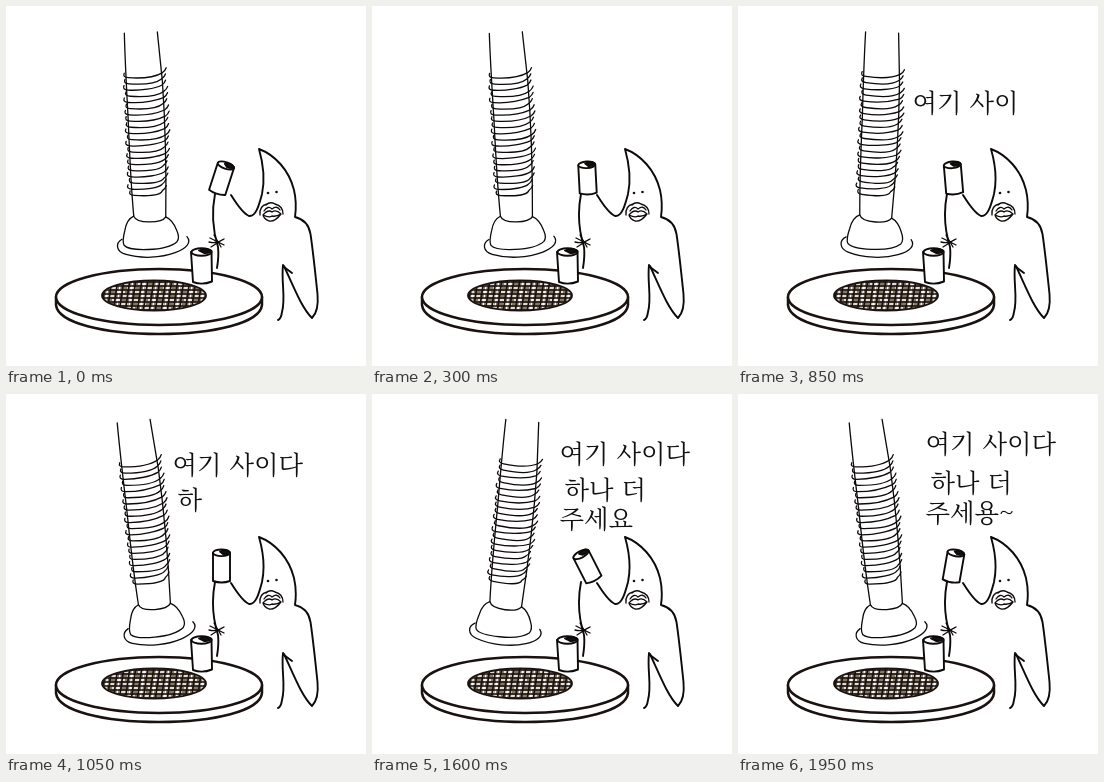
An HTML page that plays this animation: 360 px wide and 360 px high, repeating every 2300 ms.

```html
<!DOCTYPE html>
<html lang="ko">
<head>
<meta charset="utf-8">
<style>
html, body { margin: 0; width: 100%; height: 100%; overflow: hidden; background: #fff; }
svg { display: block; width: 100vw; height: 100vh; }
.ink { fill: none; stroke: #0d0a09; stroke-width: 1.9; stroke-linecap: round; stroke-linejoin: round; }
.white { fill: #fff; }
.thin { stroke-width: 1.3; }
.plate { stroke: #1a1210; stroke-width: 2.5; }
text { font: 300 25.4px "Noto Serif CJK KR", "Noto Serif KR", "Noto Sans CJK KR", "Noto Sans CJK", serif; fill: #111; white-space: pre; }
</style>
</head>
<body>
<svg viewBox="0 0 360 360">
  <defs>
    <clipPath id="grillClip"><ellipse cx="148" cy="289.5" rx="51.5" ry="14.5"/></clipPath>
  </defs>

  <g id="pipe" class="ink thin">
    <path d="M119.500 27C120 60 121.500 90 122.500 115C123.500 150 125 185 127 210Q129 216 143 216Q156 216 159 211C160 170 160 125 157 75L152.500 26"/>
    <path d="M127 210Q120 213 118 224Q115 235 117 239Q121 244 141 243.500Q162 243 170 236Q173 232 170 225Q166 214 159 211"/>
    <path d="M115 233C108 237 109 245 118 248C134 253 154 252 168 247C179 243 185 237 180 231"/>
    <path id="coils"/>
  </g>

  <g class="ink plate">
    <path class="white" d="M50 291V299C52 317 98 328 153 328S254 317 256 299V291"/>
    <ellipse class="white" cx="153" cy="291" rx="103" ry="28"/>
    <g clip-path="url(#grillClip)" stroke-linecap="butt">
      <rect x="94" y="272" width="110" height="36" fill="#857963" stroke="none"/>
      <path id="gaps" stroke="#fff" stroke-width="1.400"/>
      <path id="bars" stroke-width="1.700"/>
    </g>
    <ellipse cx="148" cy="289.500" rx="52" ry="15" stroke-width="1.800"/>
  </g>

  <g class="ink">
    <path d="M211 262Q213 250 212 241C208 228 205 208 209 188"/>
    <path d="M225 189C230 197 236 207 243 210C250 211 253 199 256 188C259 174 257 157 253 143C269 149 283 164 288 184Q291 197 289 211C297 213 303 219 304.500 228C307 245 309 264 311.500 288Q313 305 306 312C296 302 289 284 278 260"/>
    <path d="M277 259C275 276 280 292 276 306Q275 313 272 314M278 261L286 267"/>
    <path class="thin" d="M203 236Q211 238 218 233M204 232L218 239M208 229L215 241M205 241L216 234"/>
    <path class="thin" d="M260 199Q264 195 269 198M261 198Q253 200 254 209M269 198Q277 200 277 208M258 205Q262 199 266 203Q271 199 274 204"/>
    <path class="white thin" d="M257 209Q262 203 266 206Q270 203 275 208Q269 216 263 215Q258 213 257 209ZM257 209Q263 212 266 210Q270 211 275 208"/>
    <g fill="#111" stroke="none"><circle cx="262" cy="187" r="1.300"/><circle cx="270.500" cy="186" r="1.300"/></g>
  </g>

  <g class="ink">
    <path class="white" d="M185 246L187 276Q196 279.500 206 275.500L205.500 245"/>
    <ellipse class="white" cx="195.500" cy="246" rx="10" ry="3.800"/>
    <path fill="#111" d="M193 244.500Q200 241.500 205 244.500Q204 247.500 198 247Z"/>
  </g>

  <g id="can" class="ink">
    <path class="white" d="M207 159V187Q215.500 190 224 187V159"/>
    <ellipse class="white" cx="215.500" cy="158.800" rx="8.500" ry="3.300"/>
    <path fill="#111" d="M214 157.500Q220 154.500 223.500 158Q222 160.500 217 160Z"/>
  </g>

  <text></text><text></text><text></text>
</svg>
<script>
const LOOP = 2300, STEP = 50, LAST = 1950;
const el = id => document.getElementById(id);
const lines = document.querySelectorAll('text');

// [time, degrees]
const sway = [[0, -0.6], [150, -4.3], [750, 8.4], [1050, -4.3], [1650, 8.4], [1950, -4.3]];
const wave = [[0, 18], [300, -3], [600, -11], [1050, 0], [1350, -5], [1600, -27], [1950, 10]];

// Each keystroke as the input method composes it
const typed = [
  ['ㅇ', '여', '역', '여기', '여기 ', '여기 ㅅ', '여기 사', '여기 상', '여기 사이', '여기 사읻', '여기 사이다'],
  ['ㅎ', '하', '한', '하나', '하나 ', '하나 ㄷ', '하나 더'],
  ['ㅈ', '주', '줏', '주세', '주셍', '주세요', '주세용', '주세용~']
];
const typeStart = [450, 1000, 1350];

// [from time, x, baseline of each line]
const places = [
  [0, 174.5, 105.5, 140, 173], [1000, 166.5, 79.5, 114.5, 147], [1350, 177.5, 55.5, 90.5, 122],
  [1500, 187.5, 68.5, 104.5, 133.5], [1650, 187.5, 58.5, 97.5, 127.5]
];

function at(keys, t) {
  const i = Math.max(1, keys.findIndex(k => k[0] >= t));
  const [t0, a] = keys[i - 1], [t1, b] = keys[i];
  return a + (b - a) * (t - t0) / (t1 - t0);
}

function drawCoils() {
  let d = '';
  for (let i = 0; i < 20; i++) {
    const y = 70 + i * 6.2, wob = Math.sin(i * 2.7);
    const l = 118 + i * 0.2 + wob, r = 160 + 3 * Math.sin(i / 6) + Math.cos(i * 1.9);
    d += `M${l + 1} ${y - 3}Q${l - 1} ${y + 1} ${l + 5} ${y + 1.5}C${l + 18} ${y + 2.5} ${l + 32} ${y + 1 + wob} ${r - 4} ${y - 3}Q${r - 1} ${y - 5} ${r} ${y - 8}`;
  }
  el('coils').setAttribute('d', d);
}

function drawGrill() {
  let bars = '', gaps = '';
  for (let y = 276; y < 306; y += 4) bars += `M94 ${y}H202`;
  for (let x = 97; x < 206; x += 6) bars += `M${x + 3} 273L${x - 2} 307`;
  for (let x = 100; x < 204; x += 12) gaps += `M${x + 3} 273L${x - 2} 307`;
  for (let row = 0; row < 7; row++) {
    for (let x = 96 + row * 7 % 18; x < 202; x += 18) gaps += `M${x} ${278 + row * 4}h9`;
  }
  el('bars').setAttribute('d', bars);
  el('gaps').setAttribute('d', gaps);
}

function draw(now) {
  const t = Math.min(LAST, Math.floor(now % LOOP / STEP) * STEP);
  el('pipe').setAttribute('transform', `rotate(${at(sway, t)} 140 138)`);
  el('can').setAttribute('transform', `rotate(${at(wave, t)} 215.5 173)`);
  const place = places.filter(p => p[0] <= t).pop();
  lines.forEach((line, i) => {
    const n = Math.min(typed[i].length - 1, (t - typeStart[i]) / STEP);
    line.textContent = n < 0 ? '' : typed[i][n];
    line.setAttribute('x', place[1] + (i === 1 ? 5 : 0));
    line.setAttribute('y', place[2 + i]);
  });
}

drawCoils();
drawGrill();
const start = performance.now();
function tick() {
  draw(performance.now() - start);
  requestAnimationFrame(tick);
}
tick();
</script>
</body>
</html>
```
